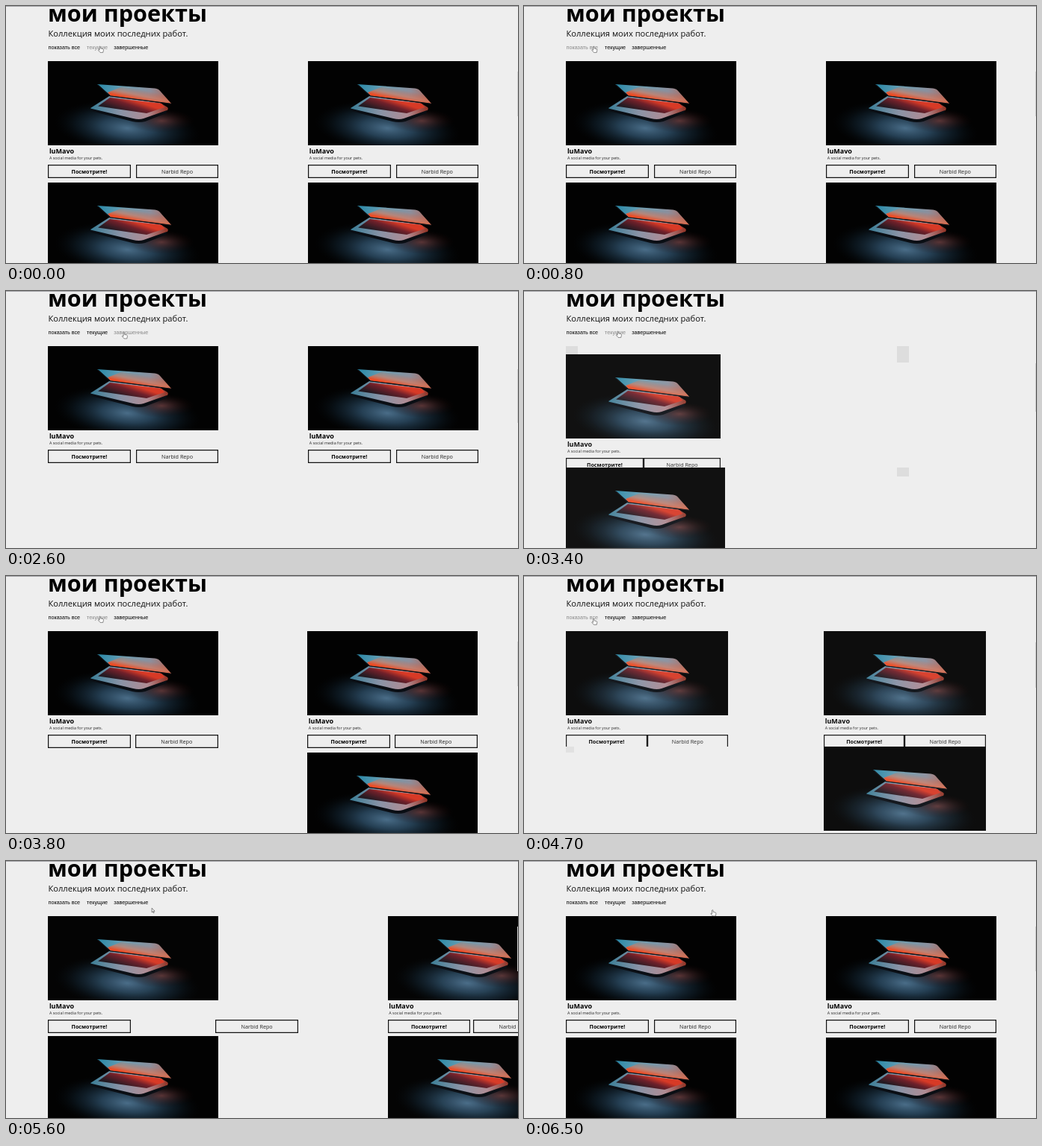
Animation, 685 px wide and 345 px high, one loop 6600 ms. Source, as an HTML page:

```html
<!DOCTYPE html>
<html lang="ru">
<head>
<meta charset="utf-8">
<title>Проекты</title>
<style>
  html, body { margin: 0; width: 100%; height: 100%; overflow: hidden; background: #eee; }
  #stage {
    position: relative; width: 685px; height: 345px; overflow: hidden;
    background: #eee; color: #000; font-family: "Open Sans", sans-serif;
  }
  #stage > * { position: absolute; }
  h1, p { margin: 0; white-space: nowrap; }
  h1 { left: 56px; top: -10.8px; font-size: 30.6px; line-height: 40px; font-weight: 700; }
  .lead { left: 56.4px; top: 29.2px; font-size: 11.17px; line-height: 16px; color: #111; }
  nav span {
    position: absolute; top: 50.5px; font: 7.2px/10px "Liberation Sans", Arial, sans-serif;
    white-space: nowrap;
  }
  nav .on { color: #888; }
  #grid {
    left: 56.2px; top: 73.6px; width: 570px;
    display: grid; grid-template-columns: auto auto; column-gap: 119.6px;
  }
  .card { position: relative; height: 163.8px; }
  .card svg { display: block; width: 228.2px; height: 113px; }
  .card b, .card small { position: absolute; left: 1.7px; white-space: nowrap; }
  .card b { top: 115.2px; font-size: 9px; line-height: 12px; }
  .card small { top: 126.5px; font-size: 5.4px; line-height: 8px; color: #222; }
  .links {
    position: absolute; left: 0; right: 0; top: 139.4px;
    display: flex; justify-content: space-between;
  }
  .links span {
    flex: 0 1 110.6px; min-width: 0; height: 18.4px; box-shadow: inset 0 0 0 1.2px #111;
    font-size: 7.2px; line-height: 18.4px; text-align: center; white-space: nowrap;
  }
  .links span:first-child { font-weight: 700; }
  .links span:last-child { color: #222; }
  #edge { left: 0; top: 0; width: 685px; height: 1px; background: #a2a2a6; }
  #thumb { left: 684px; width: 1px; background: #cfcfcf; }
  #cursor { left: 0; top: 0; overflow: visible; }
</style>
</head>
<body>
<div id="stage">
  <svg width="0" height="0">
    <defs>
      <linearGradient id="lid" x1="66" y1="31" x2="164" y2="57" gradientUnits="userSpaceOnUse">
        <stop offset="0" stop-color="#2787a6"/>
        <stop offset=".35" stop-color="#6a9fb4"/>
        <stop offset=".7" stop-color="#8d8f9c"/>
        <stop offset="1" stop-color="#b8604e"/>
      </linearGradient>
      <linearGradient id="sunset" x1="124" y1="38" x2="121" y2="52" gradientUnits="userSpaceOnUse">
        <stop offset="0" stop-color="#e0613c" stop-opacity="0"/>
        <stop offset=".55" stop-color="#dd7a5c" stop-opacity=".6"/>
        <stop offset="1" stop-color="#ee4a22"/>
      </linearGradient>
      <linearGradient id="deck" x1="58" y1="0" x2="158" y2="0" gradientUnits="userSpaceOnUse">
        <stop offset="0" stop-color="#3c7f98"/>
        <stop offset=".4" stop-color="#8b93a6"/>
        <stop offset=".75" stop-color="#b08c94"/>
        <stop offset="1" stop-color="#96392c"/>
      </linearGradient>
      <linearGradient id="keys" x1="110" y1="51" x2="104" y2="69" gradientUnits="userSpaceOnUse">
        <stop offset="0" stop-color="#d83a26"/>
        <stop offset=".4" stop-color="#70202a"/>
        <stop offset="1" stop-color="#231a22"/>
      </linearGradient>
      <radialGradient id="floor">
        <stop offset="0" stop-color="#4a6d88"/>
        <stop offset=".35" stop-color="#2b4a62" stop-opacity=".85"/>
        <stop offset=".7" stop-color="#122533" stop-opacity=".5"/>
        <stop offset="1" stop-color="#050a0e" stop-opacity="0"/>
      </radialGradient>
      <radialGradient id="warm">
        <stop offset="0" stop-color="#8a4440" stop-opacity=".6"/>
        <stop offset="1" stop-color="#200808" stop-opacity="0"/>
      </radialGradient>
      <symbol id="photo" viewBox="0 0 228 113" preserveAspectRatio="none">
        <rect width="228" height="113" fill="#020202"/>
        <ellipse cx="106" cy="90" rx="98" ry="36" fill="url(#floor)" transform="rotate(6 106 90)"/>
        <ellipse cx="152" cy="80" rx="44" ry="16" fill="url(#warm)"/>
        <path d="M57 63 L82 47 L150 56 L160 62 Q162 65 158 67 L128 79 Q122 80 114 79 L59 66 Z" fill="url(#deck)"/>
        <path d="M67 60.5 L83 49 L152 57 L156 62 L132 70 Z" fill="url(#keys)"/>
        <path d="M57 63.5 L114 77 Q122 79 128 77 L159 66 L158 70 L130 81 Q122 83 113 81 L58 67 Z" fill="#0a0e14"/>
        <path d="M66 31 L143 36.5 Q148 37 150 40 L165 57 L84 46.5 Z" fill="url(#lid)"/>
        <path d="M80 42 L100 34 L143 36.5 Q148 37 150 40 L165 57 L84 46.5 Z" fill="url(#sunset)"/>
        <path d="M67 32 L83 46.8 L165 57.3" fill="none" stroke="#0d1015" stroke-width="1.2"/>
      </symbol>
    </defs>
  </svg>
  <h1>мои проекты</h1>
  <p class="lead">Коллекция моих последних работ.</p>
  <nav>
    <span style="left:56.5px">показать все</span>
    <span style="left:108px">текущие</span>
    <span style="left:144.3px">завершенные</span>
  </nav>
  <div id="grid"></div>
  <div id="edge"></div>
  <div id="thumb"></div>
  <svg id="cursor" width="10" height="12">
    <path id="hand" d="M0 .6 Q.8 -.4 1.5 .6 L1.7 3 L4.6 3.6 Q5.6 4 5.4 5.2 L4.8 8.4 L1 8.4 L-1.6 5.4 Q-1.6 4.4 -.5 4.8 L.2 5.3 Z"
      fill="#fff" stroke="#444" stroke-width=".6"/>
    <path id="arrow" d="M0 0 L0 5.6 L1.3 4.5 L2.2 6.5 L3 6.1 L2.2 4.2 L3.9 4 Z"
      fill="#fff" stroke="#333" stroke-width=".6"/>
  </svg>
</div>
<script>
const LOOP = 6600, STEP = 100, FADE = 504;
const FULL_W = 228.2, FULL_H = 163.8, WIDE = 339;
const PAGE_REST = 1492, SCROLL = 506, VIEW = 345;
const CLICK = { done: 1591, current: 3315, all: 4628 };

// Each row: start time, visible share at start and at end, optional width of the first card.
const FADES = {
  current: [
    [CLICK.done, 1, 0],
    [CLICK.current, 0, 1],
    [CLICK.all, 1, 0],
    [CLICK.all + FADE, 0, 1, WIDE]
  ],
  done: [
    [CLICK.current, 1, 0, 222.5],
    [CLICK.all, 0, 1]
  ]
};
const KINDS = ["current", "current", "done", "current", "done", "current"];

// time, x, y of the pointer tip
const PATH = [
  [0, 125, 54], [100, 125, 54], [600, 92.4, 54], [1000, 92.4, 54],
  [1450, 157, 55.5], [2700, 157, 55.5], [3200, 125, 54], [4200, 125, 54],
  [4500, 92.4, 57], [4800, 92.4, 57], [5300, 138.8, 61], [5900, 251.5, 65.5], [LOOP, 251.5, 65.5]
];
const TABS = [[56, 100], [108, 136.5], [144, 191]];

const $ = id => document.getElementById(id);
const grid = $("grid"), thumb = $("thumb"), cursor = $("cursor");
const tabs = [...document.querySelectorAll("nav span")];
const swing = u => 0.5 - Math.cos(Math.PI * u) / 2;

grid.innerHTML = KINDS.map(() => `<div class="card">
  <svg><use href="#photo"/></svg>
  <b>luMavo</b><small>A social media for your pets.</small>
  <div class="links"><span>Посмотрите!</span><span>Narbid Repo</span></div>
</div>`).join("");
const cards = [...grid.children];

function shareAt(kind, t) {
  let share = 1, width;
  for (const [start, from, to, wide] of FADES[kind]) {
    if (t < start) break;
    share = from + (to - from) * swing(Math.min(1, (t - start) / FADE));
    width = wide;
  }
  return { share, width };
}

function drawCard(card, i, t) {
  const kind = KINDS[i], { share, width } = shareAt(kind, t);
  const s = card.style, moving = share < 1;
  const base = i === KINDS.indexOf(kind) && width || FULL_W;
  s.display = share > 0.0001 ? "" : "none";
  s.width = moving ? base * share + "px" : "";
  s.height = moving ? FULL_H * share + "px" : "";
  s.opacity = moving ? share : "";
  s.overflow = moving ? "hidden" : "";
}

function drawPointer(t) {
  const k = PATH.findIndex((p, i) => i && t < p[0]);
  const [t0, x0, y0] = PATH[k - 1], [t1, x1, y1] = PATH[k];
  const u = swing((t - t0) / (t1 - t0));
  const x = x0 + (x1 - x0) * u, y = y0 + (y1 - y0) * u;
  const over = TABS.findIndex(([a, b]) => x >= a && x <= b && y < 60.5);
  tabs.forEach((tab, i) => tab.classList.toggle("on", i === over));
  const hand = over >= 0 || y > 65;
  $("hand").style.display = hand ? "" : "none";
  $("arrow").style.display = hand ? "none" : "";
  cursor.style.transform = `translate(${x}px, ${y}px)`;
}

function drawScrollbar() {
  const page = PAGE_REST + grid.offsetHeight;
  thumb.style.top = SCROLL * VIEW / page + "px";
  thumb.style.height = VIEW * VIEW / page + "px";
}

function draw(now) {
  const t = Math.floor(now % LOOP / STEP) * STEP;
  cards.forEach((card, i) => drawCard(card, i, t));
  drawPointer(t);
  drawScrollbar();
}

const begin = performance.now();
function tick() {
  draw(performance.now() - begin);
  requestAnimationFrame(tick);
}
tick();
</script>
</body>
</html>
```
